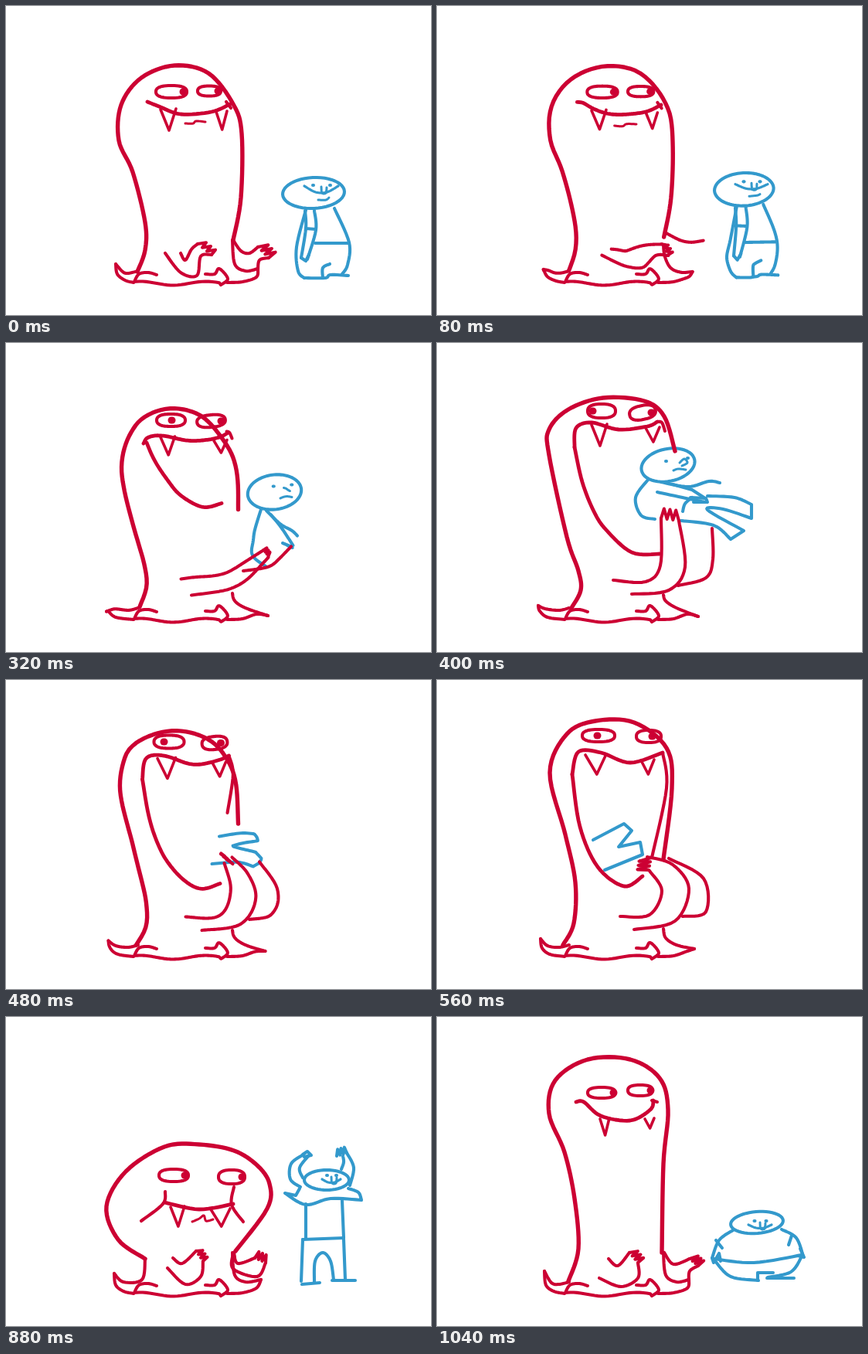
Recreate the animation shown at these times as an HTML page with a canvas. Size 550 px wide and 400 px high, loop 1120 ms.

```html
<!DOCTYPE html>
<html lang="en">
<head>
<meta charset="utf-8">
<title>Monster lunch</title>
<style>
html, body { margin: 0; width: 100%; height: 100%; overflow: hidden; background: #fff; }
canvas { display: block; }
</style>
</head>
<body>
<canvas id="stage" width="550" height="400"></canvas>
<script>
const STEP = 80, STEPS = 14;
const RED = "#cc0033", BLUE = "#3399cc";
const range = (n, fn) => Array.from({ length: n }, (_, i) => fn(i));
const lerp = (a, b, t) => a + (b - a) * t;
const between = (p, q, t) => [lerp(p[0], q[0], t), lerp(p[1], q[1], t)];

// Strokes

const poly = (...v) => range(v.length / 2, i => [v[2 * i], v[2 * i + 1]]);

// Catmull-Rom curve through the given points.
function curve(...v) {
  const p = poly(...v), last = p.length - 1;
  const get = i => p[Math.max(0, Math.min(last, i))];
  return range(last * 8 + 1, n => {
    const i = Math.floor(n / 8), u = n / 8 - i;
    const [a, b, c, d] = [-1, 0, 1, 2].map(k => get(i + k));
    return [0, 1].map(k => b[k] + u / 2 * (c[k] - a[k] +
      u * (2 * a[k] - 5 * b[k] + 4 * c[k] - d[k] + u * (3 * (b[k] - c[k]) + d[k] - a[k]))));
  });
}

// Slightly squared ellipse; power 1 is a true ellipse.
function oval(x, y, rx, ry, tilt = 0, power = 1) {
  const bulge = v => Math.sign(v) * Math.abs(v) ** power;
  return range(49, i => {
    const a = Math.PI * (1 + i / 24);
    const u = rx * bulge(Math.cos(a)), w = ry * bulge(Math.sin(a));
    return [x + u * Math.cos(tilt) - w * Math.sin(tilt), y + u * Math.sin(tilt) + w * Math.cos(tilt)];
  });
}

// Three fingers along the edge p-q, each pointing by (dx, dy).
const claw = (p, q, dx, dy) => range(7, i => {
  const [x, y] = between(p, q, i / 6);
  return i % 2 ? [x + dx, y + dy] : [x, y];
});

const tooth = (x, y, w, h) => poly(x, y, x + w * 0.55, y + h, x + w, y - 1);
const dot = (x, y) => poly(x, y, x + 1, y);
const shift = (figure, dx, dy) => Object.fromEntries(
  Object.entries(figure).map(([name, line]) => [name, line.map(([x, y]) => [x + dx, y + dy])]));

// Shared parts

// l and r: centre, radii and pupil offset of each eye.
const eyes = (l, r, tilt = 0) => ({
  eyeL: oval(l[0], l[1], l[2], l[3], 0, 0.8), pupL: dot(l[0] + l[4], l[1]),
  eyeR: oval(r[0], r[1], r[2], r[3], tilt, 0.8), pupR: dot(r[0] + r[4], r[1])
});

const teeth = (l, r) => ({ toothL: tooth(...l), toothR: tooth(...r) });

// Skirt of feet around the monster, from the tail tip to the far tip.
const feet = (x, y, farX, farY, legY) => ({
  tail: curve(x, y, x + 9, 344, 158, 346, 171, 343),
  heel: curve(x, y, x + 2, 347, x + 12, 355, 165, 358),
  toe: curve(166, 357, 172, 347, 184, 345, 195, 348),
  base: [...range(25, i => [168 + i * 4.5, 359 + 2.5 * Math.sin(i / 3 - 2)]),
    ...curve(278, 361, 287, 353, 276, 340, 270, 347, 258, 347)],
  leg: curve(293, legY, 296, 334, 310, 343, farX, farY),
  farFoot: curve(farX, farY, 324, 351, 306, 357, 286, 358)
});

const face = (x, y, w, sag) => ({
  dotL: dot(x - w / 2, y - 9), dotR: dot(x + w / 2, y - 9),
  smile: curve(x - w, y - sag, x - w / 3, y, x + w / 3, y, x + w, y - sag),
  nose: curve(x, y - 7, x + 1, y + 1, x + 6, y + 1, x + 7, y - 6)
});

// Key drawings, by step

const red = {
  0: {
    body: curve(170,344, 180,316, 180,280, 164,215, 146,174, 149,128, 175,93, 218,77, 262,87, 294,127, 305,165, 304,248, 294,303),
    ...eyes([214, 111, 20, 8, 15], [263, 110, 15, 6.5, 11]),
    mouth: curve(183,124, 198,130, 226,140, 266,137, 290,127), lip: poly(285,124, 291,132),
    chin: curve(232,152, 242,152, 246,149, 258,150),
    ...teeth([200, 134, 20, 27], [272, 137, 14, 23]),
    armTop: curve(226,320, 232,329, 240,315, 248,308), armLow: curve(206,320, 226,345, 247,349, 252,324, 266,322),
    hand: claw([248, 308], [266, 322], 8, -4),
    farTop: curve(294,303, 304,317, 315,320, 326,312), farHand: claw([326, 312], [340, 326], 11, -5),
    farLow: curve(340,326, 328,329, 326,342),
    ...feet(142, 334, 326, 340, 303)
  },
  3: {
    body: curve(172,340, 178,305, 169,250, 148,172, 148,130, 172,97, 215,80, 262,85, 297,119, 304,180, 301,245, 293,291),
    ...eyes([214, 112, 19, 7, 13], [265, 112, 20, 7, 14]),
    mouth: curve(178,125, 186,122, 198,133, 230,141, 270,139, 290,130), lip: poly(286,127, 290,133),
    jaw: curve(186,123, 197,133, 218,144, 236,154, 258,153, 270,142),
    maw: poly(216,142, 270,142, 268,150, 240,155, 222,152),
    chin: curve(225,161, 236,163, 245,160, 258,159),
    ...teeth([200, 138, 17, 19], [268, 143, 16, 13]),
    armTop: curve(225,304, 255,295, 310,293, 377,309), armLow: curve(228,328, 270,319, 315,317, 366,325),
    hand: claw([377, 309], [366, 322], 6, 5), farTop: curve(302,276, 350,276, 382,287),
    ...feet(129, 355, 340, 352, 322)
  },
  5: {
    body: curve(174,343, 186,320, 183,295, 168,251, 145,145, 145,112, 170,86, 215,71, 268,75, 294,95, 308,140),
    ...eyes([213, 88, 18, 9, -12], [266, 90, 17, 9, 11], -0.2),
    mouth: curve(178,135, 180,110, 200,103, 235,112, 272,108, 285,102), lip: curve(285,102, 291,103, 295,114),
    jaw: curve(178,135, 188,180, 203,218, 219,242, 252,271, 288,273),
    ...teeth([200, 106, 20, 27], [270, 110, 18, 18]),
    armTop: curve(228,307, 270,309, 289,288, 290,227), armLow: curve(252,325, 300,320, 321,290, 313,230),
    hand: claw([290, 227], [313, 230], 0, -13), farTop: curve(312,314, 348,304, 357,280, 356,240),
    ...feet(131, 340, 338, 354, 326)
  },
  7: {
    body: curve(163,343, 177,315, 179,262, 166,200, 146,120, 168,70, 205,53, 255,55, 297,88, 304,140, 293,232),
    ...eyes([209, 72, 21, 8, -2], [274, 73, 16, 8, 4]),
    mouth: curve(175,122, 183,93, 212,94, 250,107, 292,94), lip: curve(292,94, 297,140, 278,230),
    jaw: curve(175,122, 185,190, 208,242, 242,267, 266,254),
    ...teeth([192, 97, 27, 25], [264, 104, 17, 18]),
    armTop: curve(237,306, 275,304, 291,273, 275,247), armLow: curve(255,323, 308,312, 326,270, 305,239, 272,229),
    hand: claw([277, 230], [274, 246], -15, 2), farTop: curve(318,306, 348,300, 345,257, 300,231),
    ...feet(134, 335, 333, 348, 322)
  },
  9: {
    body: curve(174,345, 174,320, 139,272, 135,228, 155,192, 200,170, 260,168, 312,180, 338,212, 330,260, 295,313),
    ...eyes([222, 188, 18, 10, -6], [279, 190, 18, 10, 6], -0.2),
    mouth: curve(202,207, 255,213, 288,207),
    cheekL: curve(196,190, 200,215, 173,238), cheekR: curve(296,188, 290,213, 310,234),
    chin: curve(233,220, 240,223, 246,217, 250,222, 263,219),
    ...teeth([206, 210, 20, 21], [270, 212, 13, 18]),
    armTop: curve(224,318, 225,305, 230,298), armLow: curve(208,318, 228,341, 248,340, 248,300),
    hand: claw([230, 298], [248, 300], 2, -8),
    farTop: curve(294,313, 306,313, 307,300), farHand: claw([307, 300], [324, 302], 5, -7),
    farLow: curve(324,302, 323,330, 305,333, 295,313),
    ...feet(142, 336, 333, 342, 313)
  },
  11: {
    body: curve(180,313, 145,288, 130,245, 155,200, 205,168, 250,165, 295,173, 325,192, 341,216, 338,248, 297,303),
    ...eyes([217, 205, 19, 8, 14], [292, 207, 17, 9, 13]),
    mouth: curve(205,240, 250,249, 294,242),
    cheekL: curve(206,226, 203,242, 175,264), cheekR: curve(295,220, 292,243, 307,265),
    chin: curve(241,265, 250,261, 256,257, 259,264, 268,262),
    ...teeth([213, 246, 18, 25], [265, 249, 25, 22]),
    armTop: curve(216,312, 228,319, 246,303), armLow: curve(209,325, 232,346, 252,336, 255,316),
    hand: claw([246, 303], [255, 316], 7, -3),
    farTop: curve(295,305, 300,319, 322,312), farHand: claw([322, 312], [336, 318], 3, -9),
    farLow: curve(336,318, 325,336, 294,326, 294,306),
    ...feet(140, 332, 330, 340, 305), tail: curve(140,332, 152,343, 176,340, 180,313)
  },
  13: {
    body: curve(170,342, 183,300, 178,235, 165,175, 145,125, 153,82, 195,55, 250,55, 288,79, 299,120, 293,190, 291,305),
    ...eyes([213, 98, 18, 7, 15], [263, 95, 16, 7, 13]),
    mouth: curve(180,110, 190,110, 212,128, 250,134, 276,120, 280,108), lip: poly(278,108, 285,110),
    ...teeth([211, 132, 12, 21], [269, 132, 12, 12]),
    armTop: curve(222,313, 234,322, 249,305), armLow: curve(210,338, 238,349, 260,338, 260,318),
    hand: claw([249, 305], [260, 318], 9, -4),
    farTop: curve(294,305, 306,320, 327,313), farHand: claw([327, 313], [338, 322], 9, -5),
    farLow: curve(338,322, 327,329, 326,342),
    ...feet(139, 329, 326, 340, 305)
  }
};

const blue = {
  0: {
    head: oval(398, 242, 40, 20, -0.05), ...face(408, 241, 22, 8), chin: curve(404,251, 414,251, 418,248),
    sideL: curve(388,264, 376,312, 378,343, 386,352), sideR: curve(425,262, 444,306, 442,335, 435,347),
    foot: curve(386,352, 413,352, 420,348, 443,349), belt: poly(400,307, 444,307),
    arm: curve(399,265, 401,290, 390,328), armIn: curve(387,265, 388,288, 382,326),
    sleeve: poly(388,288, 401,289), hand: poly(382,326, 388,330, 392,322), crotch: curve(410,352, 410,339, 419,334)
  },
  3: {
    head: oval(396, 228, 35, 24, -0.05), ...face(405, 227, 19, 1), chin: curve(404,237, 412,234, 418,235),
    sideL: curve(387,254, 384,300, 374,325, 390,350), sideR: curve(417,247, 430,285, 431,322, 425,346),
    foot: curve(390,350, 405,350, 412,347, 438,347), belt: poly(396,304, 425,302),
    arm: curve(401,252, 402,280, 396,318), armIn: curve(384,254, 386,285, 388,318),
    sleeve: poly(384,277, 401,277), hand: poly(388,318, 390,326, 396,318), crotch: poly(408,347, 408,328, 420,320)
  },
  5: {
    head: oval(299, 158, 35, 21, -0.2), dotL: dot(296, 153), dotR: dot(324, 149),
    nose: curve(314,155, 320,150, 324,155, 317,159), chin: curve(306,165, 312,163, 322,164),
    sideL: curve(273,177, 257,200, 264,223, 282,228), hip: curve(330,200, 321,208, 318,218),
    arm: curve(285,193, 322,201, 347,206), armIn: curve(290,180, 325,186, 352,179, 366,181),
    cuff: poly(305,183, 330,190, 347,201), hand: poly(328,200, 348,201, 350,206, 332,206),
    legs: [...curve(350,198, 385,200, 407,209), ...curve(407,227, 370,215, 350,216, 397,243),
      ...curve(380,254, 358,236, 316,230)]
  },
  7: { legs: poly(202,207, 242,186, 252,195, 235,216, 263,210, 266,226, 217,246) },
  9: {
    head: oval(405, 39, 34, 19), ...face(412, 49, 24, 7),
    armL: curve(388,58, 370,80, 376,105), armInL: curve(376,66, 388,74, 405,69),
    armR: curve(424,58, 430,70, 437,86), handL: poly(371,97, 376,106, 380,98), handR: poly(433,92, 443,105, 430,104),
    shirt: curve(381,86, 405,84, 438,86), sideL: poly(385,72, 381,104), sideR: poly(428,88, 428,104),
    belt: curve(383,100, 400,104, 428,104),
    legL: curve(381,104, 376,120, 371,136), footL: poly(360,124, 374,142),
    crotch: curve(371,138, 385,139, 405,126, 427,140),
    legR: curve(430,105, 434,120, 440,133), footR: poly(427,142, 452,128)
  },
  11: {
    head: oval(415, 211, 29, 13), ...face(421, 214, 12, 4),
    armL: curve(381,220, 368,210, 369,190, 385,178), armInL: curve(384,208, 380,195, 393,178),
    armR: curve(445,218, 450,195, 441,176), armInR: curve(434,197, 437,188, 436,180),
    handL: poly(384,178, 390,174, 395,179, 386,181), handR: claw([428, 180], [441, 176], -1, -8),
    shirt: [...poly(380,222, 375,231), ...curve(361,228, 388,243, 420,235, 460,237), ...curve(460,237, 456,227, 443,222)],
    sideL: poly(388,242, 388,287), sideR: poly(435,238, 437,286), belt: poly(384,288, 437,286),
    legL: poly(384,288, 382,342), footL: poly(383,346, 406,344),
    crotch: curve(399,343, 400,316, 410,305, 420,316, 424,340),
    legR: poly(437,288, 439,340), footR: poly(422,341, 452,341)
  },
  13: {
    head: oval(414, 266, 34, 14, -0.08), ...face(418, 273, 15, 4),
    armL: curve(383,276, 365,289, 356,312), armR: curve(446,275, 465,286, 474,310),
    armInL: poly(361,289, 369,299), armInR: poly(459,283, 455,295),
    handL: poly(356,312, 358,318, 365,306, 367,316), handR: poly(470,300, 475,311, 467,309),
    shirt: curve(358,313, 410,318, 472,308),
    legL: curve(360,316, 380,336, 416,341), crotch: poly(415,341, 415,331, 435,331),
    legR: curve(472,310, 458,330, 428,337), footR: poly(427,338, 462,338)
  }
};
blue[8] = shift(blue[9], 0, -65);

// In-betweens

// n + 1 points evenly along a line.
function spread(line, n) {
  const run = [0];
  for (let i = 1; i < line.length; i++)
    run.push(run[i - 1] + Math.hypot(line[i][0] - line[i - 1][0], line[i][1] - line[i - 1][1]));
  let j = 1;
  return range(n + 1, i => {
    const d = run[run.length - 1] * i / n;
    while (j < line.length - 1 && run[j] < d) j++;
    return between(line[j - 1], line[j], (d - run[j - 1]) / (run[j] - run[j - 1] || 1));
  });
}

// Only strokes that both drawings share are blended.
function figureAt(keys, step) {
  if (keys[step]) return keys[step];
  const times = Object.keys(keys).map(Number);
  const end = times.find(k => k > step), start = times[times.indexOf(end) - 1];
  const a = keys[start], b = keys[end], t = (step - start) / (end - start), out = {};
  for (const name in a) {
    if (!b[name]) continue;
    const q = spread(b[name], 80);
    out[name] = spread(a[name], 80).map((p, i) => between(p, q[i], t));
  }
  return out;
}

// Drawing

const widths = { body: 5.4, mouth: 4.8, jaw: 4.8, pup: 9, tooth: 3.6, chin: 3, nose: 3, smile: 3.2 };
const ctx = document.getElementById("stage").getContext("2d");
ctx.lineCap = ctx.lineJoin = "round";

function ink(figure, color) {
  ctx.strokeStyle = ctx.fillStyle = color;
  for (const name in figure) {
    ctx.lineWidth = widths[name] || widths[name.slice(0, -1)] || 4.1;
    ctx.beginPath();
    for (const [x, y] of figure[name]) ctx.lineTo(x, y);
    if (name === "maw") ctx.fill();
    ctx.stroke();
  }
}

function tick(now) {
  const step = Math.floor(now / STEP) % STEPS;
  ctx.clearRect(0, 0, 550, 400);
  ink(figureAt(blue, step), BLUE);
  ink(figureAt(red, step), RED);
  requestAnimationFrame(tick);
}
tick(performance.now());
</script>
</body>
</html>
```
